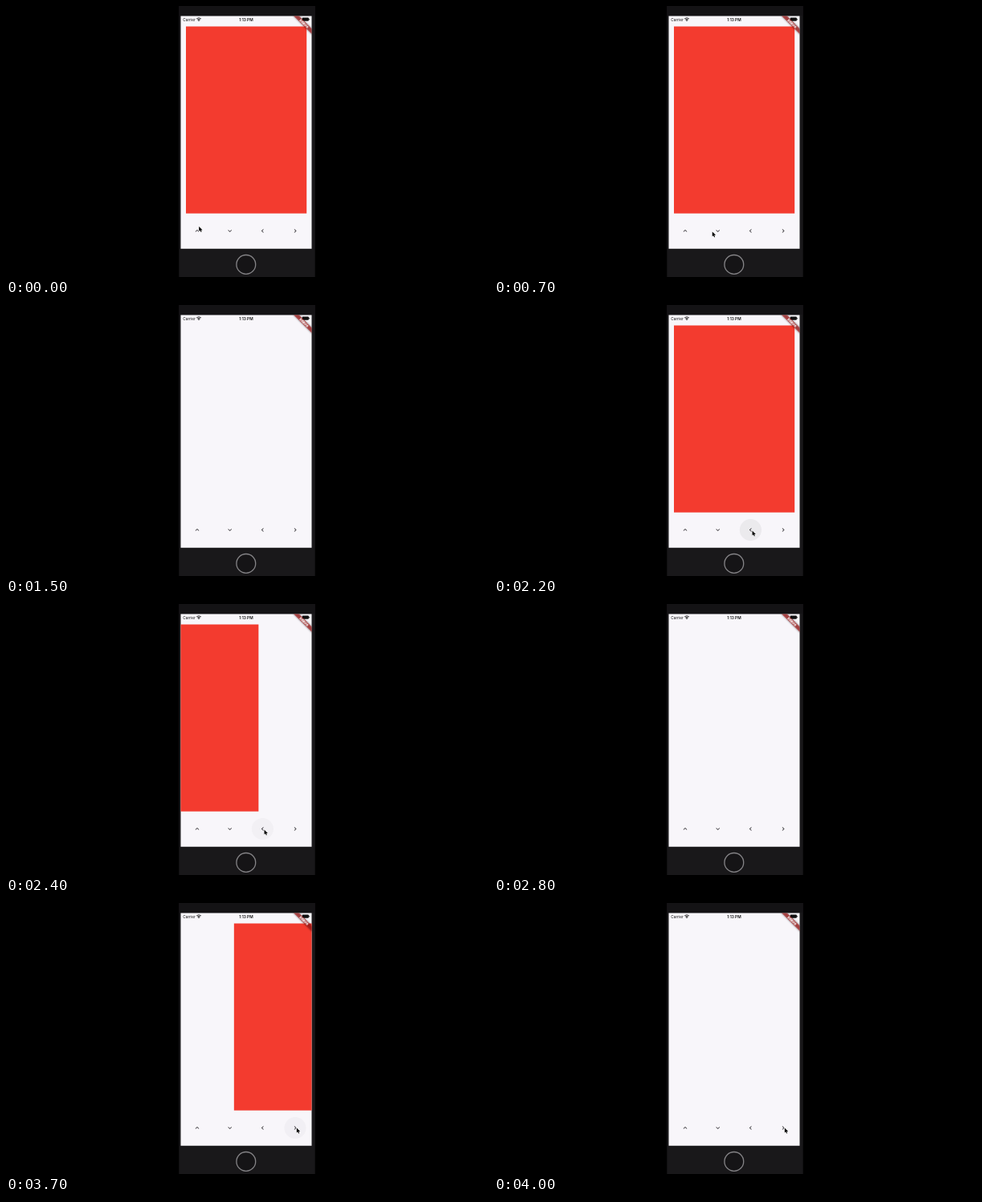
These frames come from a looping animation (600x338 px, 4.1 s). An HTML page:

```html
<!DOCTYPE html>
<html lang="en">
<head>
<meta charset="utf-8">
<title>Sliding card</title>
<style>
  html, body { margin: 0; width: 100%; height: 100%; overflow: hidden; background: #000; }
  svg { display: block; width: 100%; height: 100%; }
  text { font-family: Inter, Roboto, sans-serif; }
</style>
</head>
<body>
<svg viewBox="0 0 600 338">
  <defs>
    <clipPath id="screen"><rect x="217.5" y="12.6" width="163" height="290.2"/></clipPath>
    <path id="chevron" d="M-4.59 3.41 0 -1.17 4.59 3.41 6 2 0 -4 -6 2z" fill="#2b282d"/>
    <filter id="soft" x="-20%" y="-100%" width="140%" height="300%"><feGaussianBlur stdDeviation="1.1"/></filter>
  </defs>

  <rect width="600" height="338"/>
  <rect x="215.3" width="169.4" height="338" fill="#19181a"/>
  <rect x="215.3" width="169.4" height="12" fill="#141315"/>
  <circle cx="298.8" cy="322.4" r="11.9" fill="#151416" stroke="#858487" stroke-width="1.3"/>

  <g clip-path="url(#screen)">
    <rect x="217" y="12" width="164" height="292" fill="#f8f6fa"/>
    <circle id="ripple" cy="280.5" r="13.6" fill="#1d1b20"/>
    <rect id="card" x="224" y="25.5" width="150.2" height="233.2" fill="#f33b2f"/>

    <g fill="#111">
      <text x="220.2" y="18.7" font-size="4.8">Carrier</text>
      <text x="298.9" y="18.7" font-size="4.8" font-weight="600" text-anchor="middle">1:13 PM</text>
      <path d="M240 19.2 238.9 17.8Q240 16.9 241.1 17.8z"/>
      <g fill="none" stroke="#111" stroke-width=".8">
        <path d="M238.2 17.1Q240 15.6 241.8 17.1M237.1 15.9Q240 13.5 242.9 15.9"/>
      </g>
      <rect x="368.7" y="14.6" width="8.2" height="4.2" rx="1"/>
      <rect x="377.3" y="15.9" width=".7" height="1.6"/>
    </g>

    <g id="icons"></g>

    <g transform="translate(380.5 12.6) rotate(45)">
      <rect x="-17" y="11" width="34" height="4.75" fill="#000" opacity=".5" filter="url(#soft)"/>
      <rect x="-17" y="11" width="34" height="4.75" fill="#b71c1c" fill-opacity=".63"/>
      <text y="14.85" font-size="4" font-weight="900" fill="#fff" text-anchor="middle">DEBUG</text>
    </g>

    <path id="cursor" d="M0 0V6.1L1.4 4.8 2.4 7 3.4 6.5 2.5 4.4H4.4z" stroke="#fff" stroke-width=".9" paint-order="stroke" stroke-linejoin="round"/>
  </g>
</svg>
<script>
const LOOP = 4100, STEP = 100, SLIDE = 500;
const byId = id => document.getElementById(id);
const BUTTONS = [[238, 0], [278.7, 180], [319.4, -90], [360, 90]];

// Each slide runs from its start; the card is back in place at "reset".
const SLIDES = [
  { start: 950, dx: 0, dy: 300, reset: 1700 },
  { start: 2200, dx: -170, dy: 0, reset: 3000 },
  { start: 3500, dx: 170, dy: 0, reset: LOOP }
];
const TAPS = [
  { x: 278.7, on: 1000, fade: 1000 },
  { x: 319.4, on: 2200, fade: 2200 },
  { x: 360, on: 3300, fade: 3500 }
];
// Cursor path: time, x, y
const PATH = [
  [0, 240.2, 275], [300, 240.5, 281], [400, 240.5, 281], [800, 277.5, 281.5],
  [1200, 277.5, 281.5], [1500, 277.5, 305], [1700, 302, 305], [1800, 308, 281],
  [2000, 321.5, 281.5], [2500, 321.5, 281.5], [2800, 326, 305],
  [3000, 345, 304], [3300, 361.8, 280.5], [LOOP, 361.8, 280.5]
];

byId("icons").innerHTML = BUTTONS.map(([x, turn]) =>
  `<use href="#chevron" transform="translate(${x} 280.5) scale(.394) rotate(${turn})"/>`).join("");

const clamp = v => Math.max(0, Math.min(1, v));
const smooth = v => v * v * (3 - 2 * v);
const place = (el, x, y) => el.setAttribute("transform", `translate(${x} ${y})`);

function cursorAt(t) {
  const i = PATH.findIndex(p => p[0] > t);
  const [t0, x0, y0] = PATH[i - 1], [t1, x1, y1] = PATH[i];
  const k = smooth((t - t0) / (t1 - t0));
  return [x0 + (x1 - x0) * k, y0 + (y1 - y0) * k];
}

function draw(t) {
  const slide = SLIDES.find(s => t >= s.start && t < s.reset);
  const k = slide ? smooth(clamp((t - slide.start) / SLIDE)) : 0;
  place(byId("card"), slide ? slide.dx * k : 0, slide ? slide.dy * k : 0);

  const tap = TAPS.find(p => t >= p.on && t < p.fade + 400);
  const ripple = byId("ripple");
  ripple.setAttribute("cx", tap ? tap.x : 0);
  ripple.setAttribute("opacity", tap ? 0.055 * (1 - clamp((t - tap.fade) / 400)) : 0);

  place(byId("cursor"), ...cursorAt(t));
}

function tick() {
  const t = performance.now() % LOOP;
  draw(Math.floor(t / STEP) * STEP);
  requestAnimationFrame(tick);
}
tick();
</script>
</body>
</html>
```
